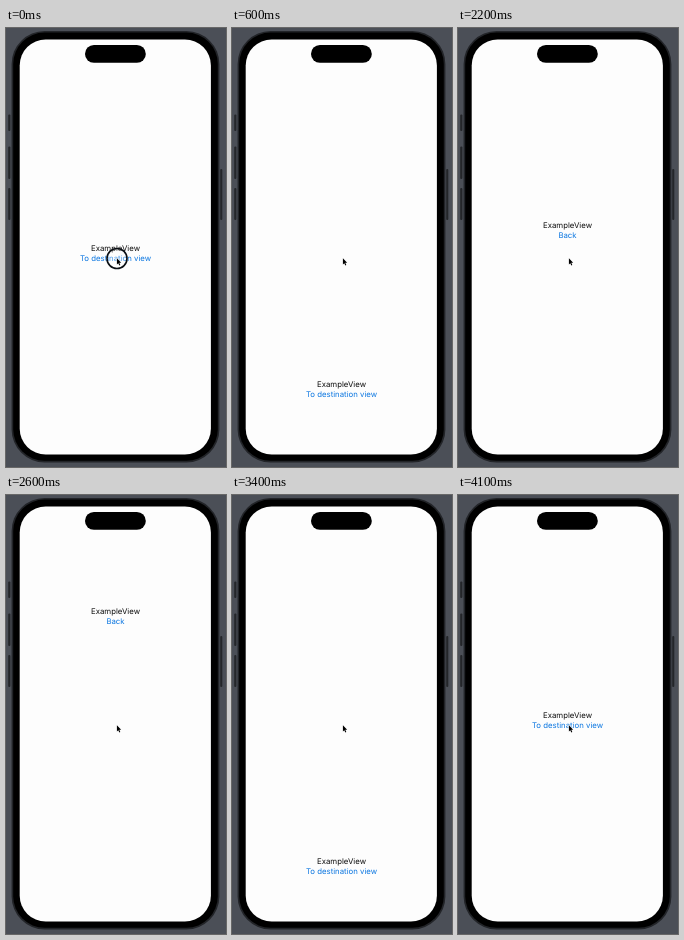
An HTML page with a canvas for the animation above (4.4 s loop, 220 px wide and 439 px high).

```html
<!DOCTYPE html>
<html lang="en">
<head>
<meta charset="utf-8">
<title>Vertical view transition</title>
<style>
  html, body { margin: 0; width: 100%; height: 100%; overflow: hidden; background: #4b4f57; }
  canvas { display: block; width: 220px; height: 439px; }
</style>
</head>
<body>
<canvas id="stage"></canvas>
<script>
const W = 220, H = 439, LOOP = 4400, STEP = 100;
const CX = 109.5, PAGE = 415;
const SCREEN = [13.7, 11.5, 204.9, 426.5, 26];
const canvas = document.getElementById('stage');
const ctx = canvas.getContext('2d');
const dpr = window.devicePixelRatio || 1;
canvas.width = Math.round(W * dpr);
canvas.height = Math.round(H * dpr);

// [time, offset] pairs, linear in between
const DOWN = [[100, 0], [400, 80.5], [600, 136], [800, 191]];
const UP = [[2100, 0], [2200, 23.5], [2700, 125], [3100, 207.5],
            [3300, 248], [3700, 335], [3900, 374], [4100, PAGE]];

function track(keys, t) {
  if (t <= keys[0][0]) return keys[0][1];
  for (let i = 1; i < keys.length; i++) {
    const [t0, v0] = keys[i - 1], [t1, v1] = keys[i];
    if (t <= t1) return v0 + (v1 - v0) * (t - t0) / (t1 - t0);
  }
  return keys[keys.length - 1][1];
}

function outline(x0, y0, x1, y1, r) {
  ctx.beginPath();
  ctx.roundRect(x0, y0, x1 - x0, y1 - y0, r);
}

function box(x0, y0, x1, y1, r, fill) {
  outline(x0, y0, x1, y1, r);
  ctx.fillStyle = fill;
  ctx.fill();
}

function page(link, dy) {
  ctx.font = '7.8px Inter, Roboto, sans-serif';
  ctx.textRendering = 'geometricPrecision';
  ctx.textAlign = 'center';
  ctx.textBaseline = 'alphabetic';
  ctx.fillStyle = '#0c0c0c';
  ctx.fillText('ExampleView', CX, 223.4 + dy);
  ctx.fillStyle = '#0b76e0';
  ctx.fillText(link, CX, 233.3 + dy);
}

const home = dy => page('To destination view', dy);
const detail = dy => page('Back', dy);

function phone() {
  ctx.fillStyle = '#4b4f57';
  ctx.fillRect(0, 0, W, H);
  for (const [y0, y1] of [[86.5, 103], [118.5, 151], [160, 192]]) box(2.2, y0, 4.4, y1, 1, '#24262a');
  box(214.2, 141, 216.3, 192, 1, '#24262a');
  box(5.6, 3, 213.4, 434.4, 33, '#222428');
  box(7.2, 4.6, 211.8, 432.8, 31.5, '#000');
  box(...SCREEN, '#fdfdfd');
}

function screen(t) {
  ctx.save();
  outline(...SCREEN);
  ctx.clip();
  if (t < 900) {
    home(track(DOWN, t));
  } else {
    const up = track(UP, t);
    detail(-up);
    home(PAGE - up);
  }
  ctx.restore();
  box(79, 17, 139.8, 34.8, 8.9, '#000');
}

function tapRing() {
  ctx.beginPath();
  ctx.arc(111, 230.5, 10, 0, Math.PI * 2);
  ctx.fillStyle = 'rgba(255,255,255,.25)';
  ctx.fill();
  ctx.lineWidth = 1.6;
  ctx.strokeStyle = '#0b0f14';
  ctx.stroke();
}

function pointer() {
  const pts = [[0, 0], [0, 6.3], [1.4, 5], [2.4, 7.3], [3.4, 6.9], [2.4, 4.6], [4.3, 4.5]];
  ctx.beginPath();
  for (const [x, y] of pts) ctx.lineTo(110.9 + x, 230.2 + y);
  ctx.closePath();
  ctx.lineJoin = 'round';
  ctx.lineWidth = 1;
  ctx.strokeStyle = '#fff';
  ctx.stroke();
  ctx.fillStyle = '#000';
  ctx.fill();
}

function draw(t) {
  ctx.setTransform(dpr, 0, 0, dpr, 0, 0);
  phone();
  screen(t);
  if (t < 100) tapRing();
  pointer();
}

const start = performance.now();
function tick() {
  const t = (performance.now() - start) % LOOP;
  draw(Math.floor(t / STEP) * STEP);
  requestAnimationFrame(tick);
}
tick();
</script>
</body>
</html>
```
